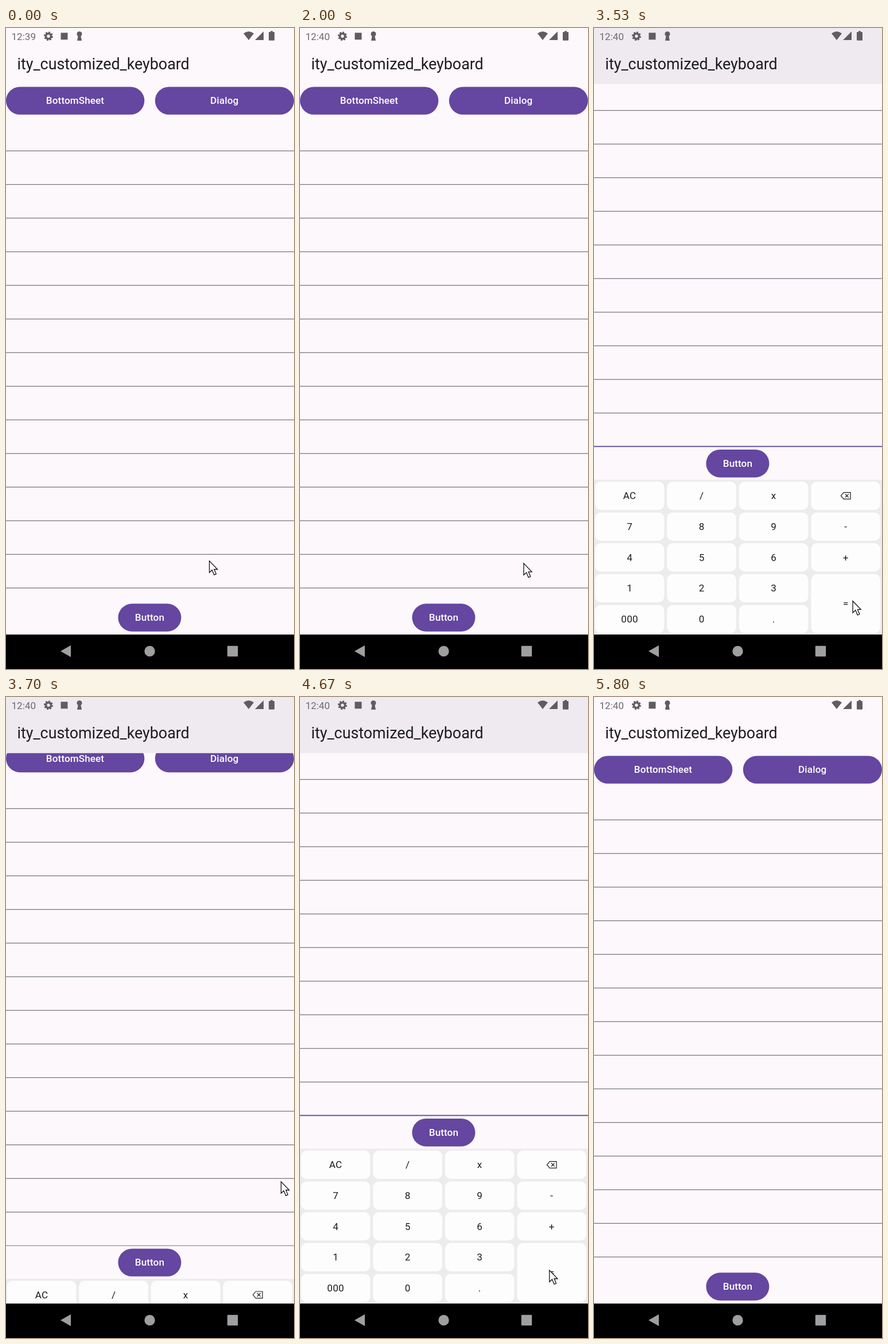
An HTML page that plays this animation: 502x1116 px, repeating every 5860 ms.

```html
<!DOCTYPE html>
<html lang="en">
<head>
<meta charset="utf-8">
<title>ity_customized_keyboard</title>
<style>
  html, body { margin: 0; width: 100%; height: 100%; overflow: hidden; background: #fdf8fc; }
  svg { display: block; width: 502px; height: 1116px; }
  text { font: 400 17.07px Roboto, "Noto Sans", sans-serif; fill: #1d1c20; }
  .label { font-weight: 500; fill: #fff; letter-spacing: .12px; text-anchor: middle; }
  .pill { fill: #6546a0; }
  .page { fill: #fdf8fc; }
  .title { font-size: 26.83px; }
  .clock { fill: #6c6a6e; }
  .status { fill: #5f5d61; }
  .nav { fill: #a09ea1; }
  .rule { fill: #78747e; }
  .focus { fill: #5c489c; }
  .key { fill: #fdfdfd; }
  .cap { text-anchor: middle; letter-spacing: .3px; }
</style>
</head>
<body>
<svg viewBox="0 0 502 1116">
  <defs>
    <clipPath id="port"><rect id="portBox" y="97.5" width="502" height="900"/></clipPath>
  </defs>
  <rect class="page" width="502" height="1116"/>

  <g clip-path="url(#port)">
    <g id="list">
      <rect class="pill" x="0" y="102.4" width="241.3" height="48.4" rx="24.2"/>
      <rect class="pill" x="259.8" y="102.4" width="242.2" height="48.4" rx="24.2"/>
      <text class="label" x="120.5" y="132.4">BottomSheet</text>
      <text class="label" x="380.7" y="132.4">Dialog</text>
      <g id="rules"></g>
      <rect id="focus" class="focus" y="973.6" width="502" height="2"/>
    </g>
  </g>

  <g id="action">
    <rect class="pill" x="195.4" y="1002.3" width="110" height="48.4" rx="24.2"/>
    <text class="label" x="250.4" y="1032.4">Button</text>
  </g>

  <g id="pad"><rect width="502" height="300" fill="#ececec"/></g>

  <rect id="bar" width="502" height="97.5" fill="#eeeaf0"/>
  <text class="title" x="19.5" y="71.5">ity_customized_keyboard</text>

  <text id="clock" class="clock" x="9.5" y="20.8">12:39</text>
  <g class="status">
    <g fill="none" stroke="#5f5d61">
      <circle cx="74" cy="14.3" r="4.5" stroke-width="3.6"/>
      <circle cx="74" cy="14.3" r="6.8" stroke-width="2.4" stroke-dasharray="2.9 2.44"/>
    </g>
    <rect x="95.5" y="8.3" width="12" height="12"/>
    <circle cx="128" cy="10.4" r="4.5"/>
    <path d="M126 12H130L132 22H124Z"/>
    <path d="M414 9.5Q423 2.5 432 9.5L423 21Z"/>
    <path d="M434 21H449V6Z"/>
    <path d="M458 8Q458 7 459 7H461V5.3H465V7H467Q468 7 468 8V20.5Q468 21.7 467 21.7H459Q458 21.7 458 20.5Z"/>
  </g>

  <rect y="1056" width="502" height="60"/>
  <g class="nav">
    <path d="M95 1085L113 1074.7V1095.3Z"/>
    <circle cx="250.5" cy="1085" r="9.2"/>
    <rect x="385.8" y="1075.8" width="18.4" height="18.4" rx="1.2"/>
  </g>

  <path id="pointer" d="M.5 .8V21L5.2 16.7L8.8 25.2L12.3 23.6L8.8 15.5H14.6Z"
        fill="#fff" stroke="#111" stroke-width="1.3"/>
</svg>

<script>
const $ = id => document.getElementById(id);
const LOOP = 5860, FPS = 30, PAD = 268.3, SLACK = 22.3;

function add(parent, tag, attrs, text) {
  const el = document.createElementNS("http://www.w3.org/2000/svg", tag);
  for (const k in attrs) el.setAttribute(k, attrs[k]);
  if (text) el.textContent = text;
  parent.appendChild(el);
}

for (let i = 0; i < 14; i++)
  add($("rules"), "rect", { class: "rule", y: 213.3 + 58.54 * i, width: 502, height: 1.25 });

const rows = [["AC", "/", "x", "⌫"], ["7", "8", "9", "-"], ["4", "5", "6", "+"], ["1", "2", "3", "="], ["000", "0", "."]];
rows.forEach((row, r) => row.forEach((cap, c) => {
  const x = 1.8 + 125.55 * c, y = 3.3 + 53.65 * r;
  const height = cap === "=" ? 102.7 : 49.2;
  const cx = x + 60.3, cy = y + height / 2;
  add($("pad"), "rect", { class: "key", x, y, width: 120.6, height, rx: 10 });
  if (cap === "⌫") {
    add($("pad"), "path", {
      d: "M-8.3 0L-3.5 -5.8H8.3V5.8H-3.5ZM-1 -3L5 3M5 -3L-1 3",
      transform: `translate(${cx} ${cy})`, fill: "none", stroke: "#1d1c20", "stroke-width": 1.2
    });
  } else {
    add($("pad"), "text", { class: "cap", x: cx, y: cy + 6 }, cap);
  }
}));

// Pointer stops: time, x, y
const stops = [
  [0, 354, 927], [500, 340, 905], [1167, 276, 800], [1700, 350, 880], [2080, 400, 945],
  [2160, 400, 945], [2633, 441, 779], [3100, 440, 860], [3430, 450, 1000], [3530, 450, 1000],
  [3700, 479, 843], [4000, 440, 900], [4190, 415, 955], [4333, 417, 980], [4700, 436, 999],
  [4900, 436, 999], [5300, 460, 1068], [5600, 490, 1055], [5767, 520, 1050], [LOOP, 520, 1050]
];

// Each opening of the pad: start of rise, start of fall
const visits = [[2150, 3550], [4232, 4775.5]];

function ease(t, start, span) {
  const p = Math.min(1, Math.max(0, (t - start) / span));
  return p * p * (3 - 2 * p);
}

function pointerAt(t) {
  const i = stops.findIndex(s => s[0] > t);
  const a = stops[i - 1], b = stops[i];
  const p = (t - a[0]) / (b[0] - a[0]);
  return [a[1] + (b[1] - a[1]) * p, a[2] + (b[2] - a[2]) * p];
}

const move = (id, x, y) => $(id).setAttribute("transform", `translate(${x} ${y})`);
const show = (id, on) => $(id).setAttribute("visibility", on ? "visible" : "hidden");

function draw(t) {
  let lift = 0, scroll = 0, focused = false;
  for (const [up, down] of visits) {
    const h = PAD * (ease(t, up, 200) - ease(t, down, 200));
    lift += h;
    // The list follows the pad late on the way up, and is clamped on the way down
    scroll += Math.min((PAD - SLACK) * ease(t, up + 118, 150), Math.max(0, h - SLACK));
    focused = focused || (t >= up && t < down);
  }
  move("list", 0, -scroll);
  move("action", 0, -lift);
  move("pad", 0, 1054.8 - lift);
  move("pointer", ...pointerAt(t));
  $("portBox").setAttribute("height", 900.2 - lift);
  show("pad", lift > 0);
  show("bar", scroll > 0);
  show("focus", focused);
  $("clock").textContent = t < 1860 ? "12:39" : "12:40";
}

const start = performance.now();
function tick() {
  const t = (performance.now() - start) % LOOP;
  const frame = Math.floor((t + 7) * FPS / 1000);
  draw(Math.min(frame * 1000 / FPS, LOOP - 1));
  requestAnimationFrame(tick);
}
tick();
</script>
</body>
</html>
```
